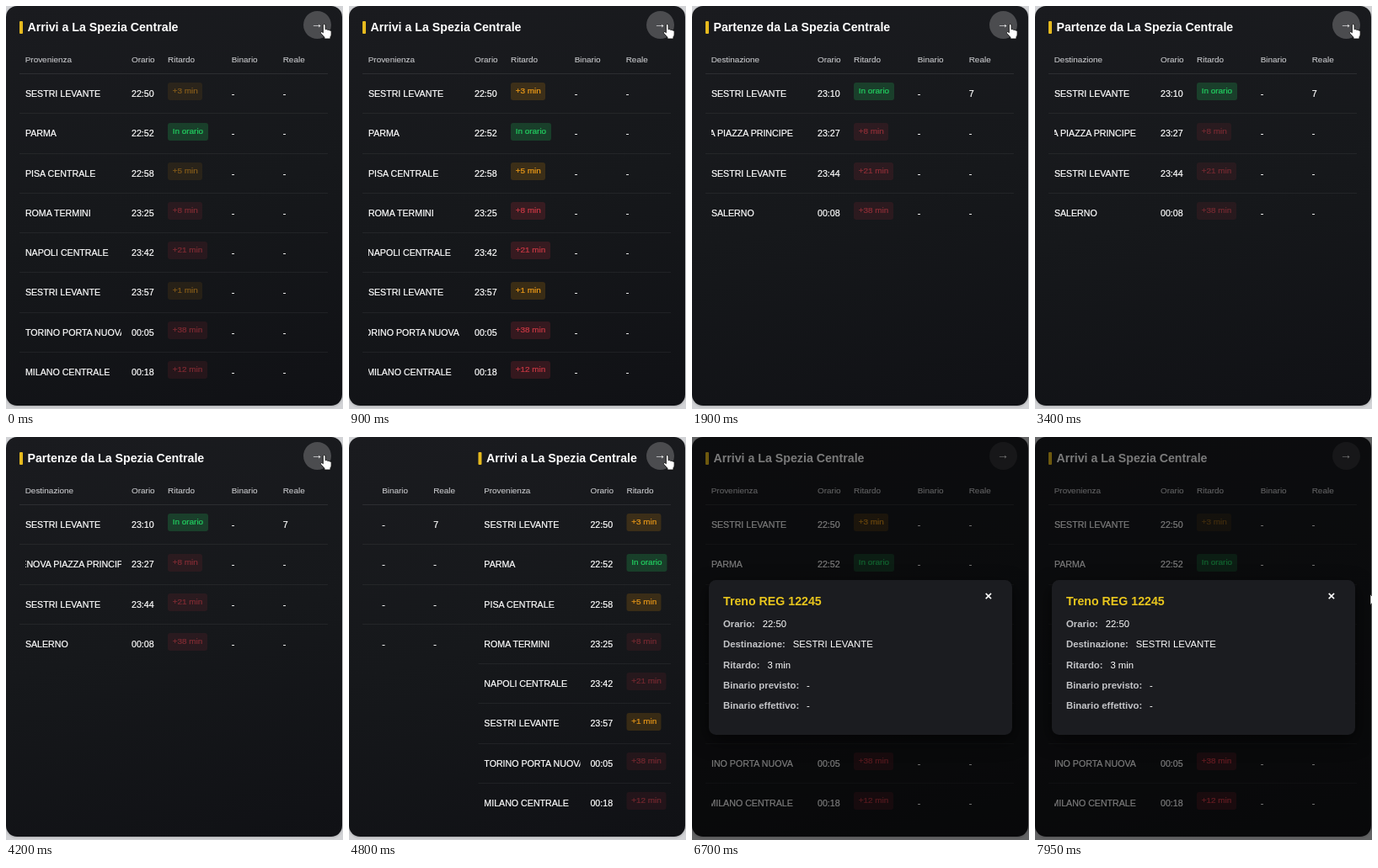
An HTML page for the animation above (8 s loop, 400x479 px).

```html
<!DOCTYPE html>
<html lang="it">
<head>
<meta charset="utf-8">
<title>Tabellone treni</title>
<style>
  html, body { margin: 0; width: 100%; height: 100%; overflow: hidden; background: #d2d3d6; }
  #stage * { box-sizing: border-box; }
  #stage { position: relative; width: 400px; height: 479px; overflow: hidden; color: #fff;
    font: 10.65px "Liberation Sans", Arial, sans-serif; white-space: nowrap; cursor: default; }
  #stage div, #stage svg { position: absolute; }
  #card { left: 0; top: 0; width: 399.4px; height: 475px; border-radius: 13px;
    background: linear-gradient(165deg, #1a1b1f, #16181b 50%, #101115); box-shadow: 0 1px 3px #0003; }
  #view { left: 16px; top: 0; width: 366px; height: 475px; overflow: hidden; }
  #track { left: 0; top: 0; }
  .page { top: 0; width: 366px; height: 475px; }
  .title { left: 9.5px; top: 15px; line-height: 20px; font-size: 14.2px; font-weight: bold; }
  .bar { left: .4px; top: 18px; width: 3.6px; height: 15px; border-radius: 1px; background: #e6ba1e; }
  .head { left: 0; top: 46px; width: 366px; height: 35px; border-bottom: 1px solid #ffffff16;
    font-size: 9.95px; line-height: 35px; color: #c8c9cc; -webkit-text-stroke: .1px; }
  .row { left: 0; width: 366px; height: 47.25px; line-height: 47.25px; border-bottom: 1px solid #ffffff0e;
    -webkit-text-stroke: .22px; }
  .row:last-child { border: 0; }
  .name { left: 6.9px; width: 114.1px; height: 46px; overflow: hidden; }
  .name div { left: 0; }
  .badge { left: 176px; top: 10.4px; height: 21px; padding: 0 5.7px; border-radius: 3px;
    font-size: 9.95px; line-height: 20px; }
  .ok { color: #22cd60; background: #22c55e38; }
  .slow { color: #f09c18; background: #f59e0b2b; }
  .late { color: #d23a46; background: #dc35452e; }
  #next { left: 352.5px; top: 5.5px; width: 33px; height: 33px; border-radius: 50%;
    font-size: 14.2px; line-height: 31px; text-align: center; }
  #shade { left: 0; top: 0; width: 400px; height: 479px; background: #00000085; }
  #modal { left: 19.5px; top: 169.5px; width: 360px; height: 184px; border-radius: 8.5px;
    background: #1b1c20; box-shadow: 0 7px 21px #0009; font-size: 11.36px; }
  #modal div { left: 17.5px; line-height: 20px; }
  #modal .train { top: 15.5px; font-size: 14.2px; font-weight: bold; color: #e8c51d; }
  #modal .close { left: 328px; top: 9.5px; font-size: 15px; font-weight: bold; }
  #modal b { color: #c4c5c8; margin-right: 5.7px; }
  #hand, #arrow { left: 0; top: 0; overflow: visible; }
</style>
</head>
<body>
<div id="stage">
  <div id="card"></div>
  <div id="view"><div id="track"></div></div>
  <div id="next">→</div>
  <div id="shade"></div>
  <div id="modal">
    <div class="train">Treno REG 12245</div>
    <div class="close">×</div>
  </div>
  <svg id="hand" width="15" height="18" viewBox="0 0 13.2 17" preserveAspectRatio="none"
    fill="#fff" stroke="#111" stroke-width=".8" stroke-linejoin="round">
    <path d="M3.4 10.2V1.8q0-1.3 1.2-1.3t1.2 1.3v4.6q1.9-.7 2.2.5 1.7-.5 2 .6 2-.3 2 1.3v3.4q0 1.6-1 2.6v2.2H4.8v-1.7L.9 10.6q-.7-1.3.4-1.6 1-.2 2.1 1.2z"/>
  </svg>
  <svg id="arrow" width="12" height="18" fill="#fff" stroke="#111" stroke-width=".7">
    <path d="M0 0v12.5l2.9-2.7 1.9 4.4 2-.9-1.9-4.2h4z"/>
  </svg>
</div>
<script>
const LOOP = 8000, PAGE = 366, ROW = 47.25;
const $ = id => document.getElementById(id);

const arrivals = {
  title: 'Arrivi a La Spezia Centrale', place: 'Provenienza',
  rows: [['SESTRI LEVANTE', '22:50', 3], ['PARMA', '22:52', 0], ['PISA CENTRALE', '22:58', 5],
    ['ROMA TERMINI', '23:25', 8], ['NAPOLI CENTRALE', '23:42', 21], ['SESTRI LEVANTE', '23:57', 1],
    ['TORINO PORTA NUOVA', '00:05', 38], ['MILANO CENTRALE', '00:18', 12]]
};
const departures = {
  title: 'Partenze da La Spezia Centrale', place: 'Destinazione',
  rows: [['SESTRI LEVANTE', '23:10', 0, '7'], ['GENOVA PIAZZA PRINCIPE', '23:27', 8],
    ['SESTRI LEVANTE', '23:44', 21], ['SALERNO', '00:08', 38]]
};
const details = [['Orario', '22:50'], ['Destinazione', 'SESTRI LEVANTE'], ['Ritardo', '3 min'],
  ['Binario previsto', '-'], ['Binario effettivo', '-']];

function add(parent, cls, text = '', style = {}) {
  const el = document.createElement('div');
  el.className = cls;
  el.textContent = text;
  Object.assign(el.style, style);
  return parent.appendChild(el);
}
const cell = (parent, x, text) => add(parent, '', text, { left: x + 'px' });

function buildPage({ title, place, rows }, index) {
  const page = add($('track'), 'page', '', { left: index * PAGE + 'px' });
  add(page, 'bar');
  add(page, 'title', title);
  const head = add(page, 'head');
  [[6.7, place], [133, 'Orario'], [176, 'Ritardo'], [251.7, 'Binario'], [312.7, 'Reale']]
    .forEach(([x, text]) => cell(head, x, text));
  rows.forEach(([name, time, delay, platform = '-'], i) => {
    const row = add(page, 'row', '', { top: 81 + i * ROW + 'px' });
    add(add(row, 'name'), 'label', name);
    cell(row, 133, time);
    const kind = delay === 0 ? 'ok' : delay > 5 ? 'late' : 'slow';
    add(row, 'badge ' + kind, delay ? `+${delay} min` : 'In orario');
    cell(row, 251.7, '-');
    cell(row, 312.7, platform);
  });
  return page;
}
const pages = [arrivals, departures, arrivals].map(buildPage);

details.forEach(([label, value], i) => {
  const line = add($('modal'), '', '', { top: 42.3 + i * 24.4 + 'px' });
  line.innerHTML = `<b>${label}:</b> ${value}`;
});

const labels = [...document.querySelectorAll('.label')]
  .map(el => ({ el, shift: Math.min(0, 97 - el.getBoundingClientRect().width) }));
const slow = document.querySelectorAll('.slow');
const late = document.querySelectorAll('.late');
const hoverRow = pages[2].querySelector('.row');

const ramp = (t, from, to) => Math.max(0, Math.min(1, (t - from) / (to - from)));
const ease = p => p < .5 ? 2 * p * p : 1 - 2 * (1 - p) ** 2;
const move = (t, from, to) => ease(ramp(t, from, to));
const pulse = (t, period, low) => .75 - .25 * Math.cos(2 * Math.PI * (t - low) / period);
const place = (el, x, y) => { el.style.transform = `translate(${x}px,${y}px)`; };

function draw(t) {
  place($('track'), -PAGE * (move(t, 1421, 1871) + move(t, 4546, 4996)), 0);

  const m = t % 5000;
  const scroll = move(m, 300, 1500) - move(m, 3500, 4700);
  labels.forEach(({ el, shift }) => place(el, shift * scroll, 0));

  slow.forEach(el => el.style.opacity = pulse(t, 2000, 0));
  late.forEach(el => el.style.opacity = pulse(t, 700, 620));

  const leave = move(t, 5250, 5800), exit = move(t, 6350, 6700);
  place($('hand'), 372.5 - 280 * leave + 330 * exit, 21 + 81 * leave + 80 * exit);
  place($('arrow'), 410 - 12 * ramp(t, 7800, 7930), 187);

  const lit = 1 - ramp(t, 5280, 5480);
  $('next').style.background = `rgba(255,255,255,${.1 + .12 * lit})`;
  const hover = ramp(t, 5480, 5630) - ramp(t, 6150, 6350);
  hoverRow.style.background = `rgba(255,255,255,${.045 * hover})`;

  const open = move(t, 6130, 6380);
  $('shade').style.opacity = $('modal').style.opacity = open;
  $('modal').style.transform = `scale(${.95 + .05 * open})`;
}

const start = performance.now();
function tick() {
  draw((performance.now() - start) % LOOP);
  requestAnimationFrame(tick);
}
tick();
</script>
</body>
</html>
```
